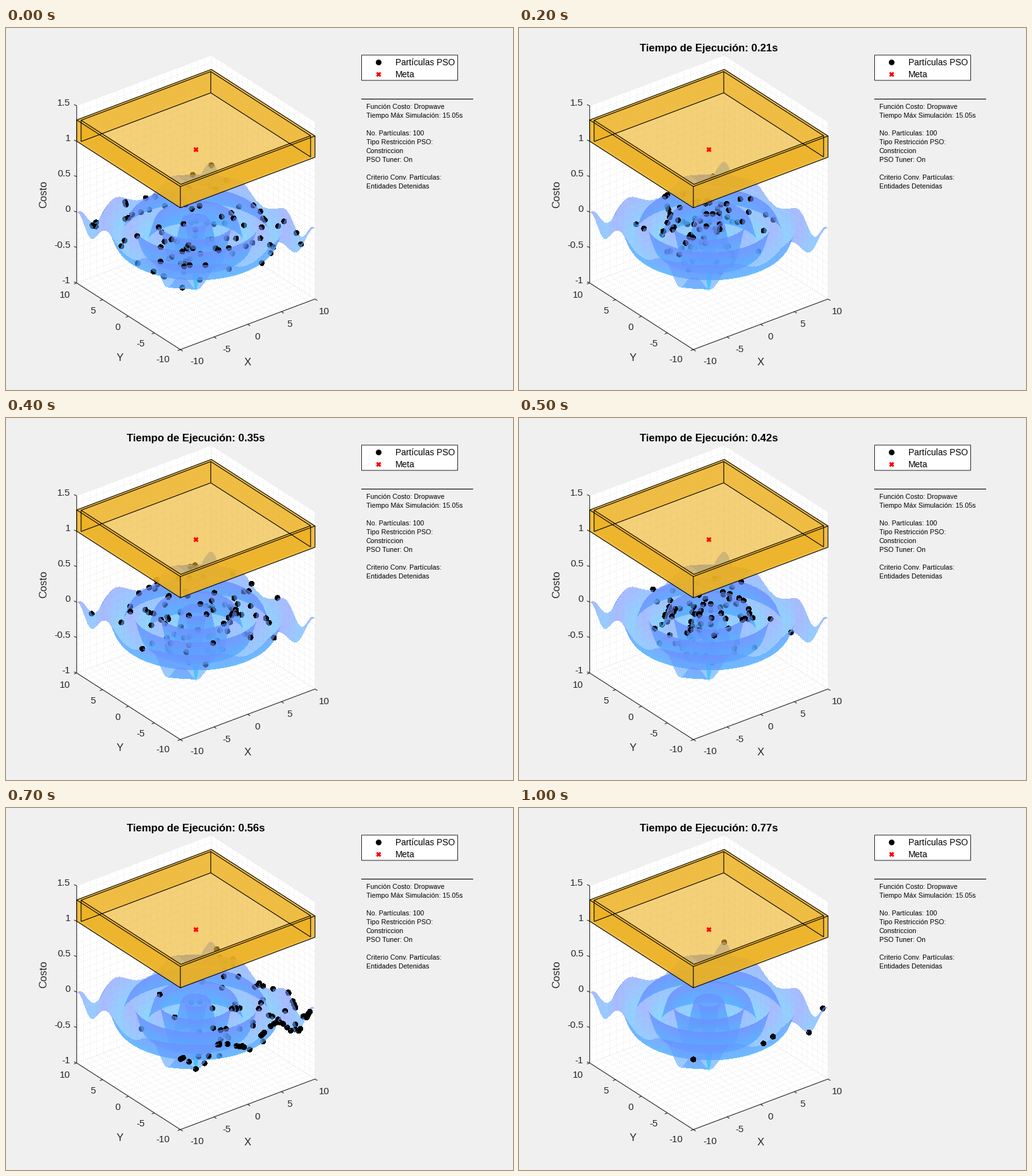
Animation, 802 px wide and 573 px high, one loop 1100 ms. Source, as a matplotlib script:

```python
import numpy as np
import matplotlib.pyplot as plt
from matplotlib.animation import FuncAnimation
from matplotlib.collections import LineCollection

W, H, DPI = 802, 573, 64
PT = 72 / DPI
FRAMES, STEP = 11, 100
INK = "#262626"

# orthographic view: screen step of one unit along each axis
OX, OY = 275.8, 509.0
XX, XY, YX, YY, ZY = 10.65, 4.0, 8.2, 5.27, 112.2

plt.rcParams["font.family"] = "Liberation Sans"
fig = plt.figure(figsize=(W / DPI, H / DPI), dpi=DPI, facecolor="#f0f0f0")
ax = fig.add_axes([0, 0, 1, 1])
ax.axis("off")


def proj(x, y, z):
    x, y, z = np.broadcast_arrays(*(np.asarray(v, float) for v in (x, y, z)))
    return np.stack([OX + XX * (x + 10) - YX * (y + 10),
                     OY - XY * (x + 10) - YY * (y + 10) - ZY * (z + 1)], -1)


def unproj(px, py, z):
    """Point at height z that is seen at the given pixel."""
    a, b = px - OX, OY - ZY * (z + 1) - py
    det = XX * YY + YX * XY
    return (YY * a + YX * b) / det - 10, (XX * b - XY * a) / det - 10


def depth(x, y, z):
    return -7.08 * x - 9.22 * y + 64.9 * z


def cost(x, y):
    r = np.hypot(x, y)
    return -(1 + np.cos(2.03 * r)) / (0.5 * r + 2)


def path3(pts):
    return proj(*np.array(pts, float).T)


def line(pts, color="k", width=1.1, z=1):
    pts = np.asarray(pts)
    ax.plot(pts[:, 0], pts[:, 1], color=color, lw=width * PT, zorder=z,
            snap=False, solid_capstyle="butt", solid_joinstyle="round")


def face(pts, color, alpha=1.0, z=0):
    p = path3(pts)
    ax.fill(p[:, 0], p[:, 1], fc=color, alpha=alpha, lw=0, zorder=z)


def text(x, y, s, size, ha="left", color=INK, **kw):
    """Text with its capitals centred on y."""
    return ax.text(x, y + 0.36 * size, s, fontsize=size * PT, ha=ha,
                   va="baseline", color=color, zorder=9, **kw)


def cross(x, y):
    ax.plot(x, y, "x", color="r", ms=6.6 * PT, mew=3 * PT, zorder=8)


# ---- axes box, grid and labels ----
def draw_axes():
    face([(-10, -10, -1), (10, -10, -1), (10, 10, -1), (-10, 10, -1)], "w")
    face([(-10, 10, -1), (10, 10, -1), (10, 10, 1.5), (-10, 10, 1.5)], "w")
    face([(10, -10, -1), (10, 10, -1), (10, 10, 1.5), (10, -10, 1.5)], "w")

    grid = []
    for v in range(-10, 11):
        grid.append(path3([(v, -10, -1), (v, 10, -1), (v, 10, 1.5)]))
        grid.append(path3([(-10, v, -1), (10, v, -1), (10, v, 1.5)]))
    for v in np.linspace(-1, 1.5, 26):
        grid.append(path3([(-10, 10, v), (10, 10, v), (10, -10, v)]))
    ax.add_collection(LineCollection(grid, colors="0.84", linewidths=0.9 * PT,
                                     linestyles=[(0, (1, 3))], zorder=0.5))

    line(path3([(10, -10, -1), (-10, -10, -1), (-10, 10, -1), (-10, 10, 1.5)]), INK)

    def tick(p, dx, dy):
        line([p, p + np.array([dx, dy])], INK)

    for i, v in enumerate(range(-10, 11, 5)):
        tick(proj(v, -10, -1), 3.8, 2.4)
        tick(proj(-10, v, -1), -4.2, 1.6)
        text(291 + 51 * i, 527 - 19.75 * i, str(v), 15)
        text(259 - 39.25 * i, 524 - 25.7 * i, str(v), 15, "right")
    for v in np.arange(-1, 1.6, 0.5):
        p = proj(-10, 10, v)
        tick(p, -4.2, -1.8)
        text(102, p[1] - 5.4, f"{v:g}", 15, "right")

    text(382, 528, "X", 16.6, "center")
    text(180, 521, "Y", 16.6, "center")
    ax.text(59.5, 263.5, "Costo", fontsize=16.6 * PT, rotation=90, color=INK,
            ha="center", va="center", zorder=9)


# ---- translucent tray above the surface ----
def draw_tray():
    gold, lo, hi = (237 / 255, 177 / 255, 32 / 255), 1.0, 1.3

    def ring(s):
        return [(-s, s), (s, s), (s, -s), (-s, -s)]   # left, back, right, front

    def at(xy, z):
        return (*xy, z)

    out, inn = ring(10), ring(9.63)
    face([at(p, lo) for p in out], gold, 0.6, 5)
    for i in range(4):
        j = (i + 1) % 4
        for r in (out, inn):
            face([at(r[i], lo), at(r[j], lo), at(r[j], hi), at(r[i], hi)], gold, 0.6, 5)
        face([at(out[i], hi), at(out[j], hi), at(inn[j], hi), at(inn[i], hi)], gold, 0.6, 5)

    for r, ids in ((out, (0, 3, 2)), (inn, (0, 1, 2))):
        line(path3([at(r[i % 4], hi) for i in range(5)]), z=6)
        line(path3([at(r[i], lo) for i in ids]), z=6)
        for i in ids:
            line(path3([at(r[i], lo), at(r[i], hi)]), z=6)
    cross(*proj(0, 0, 1))


# ---- legend and notes ----
def draw_notes():
    ax.add_patch(plt.Rectangle((562.5, 42.9), 152, 40, fc="w", ec=INK, lw=PT,
                               snap=False, zorder=7))
    ax.plot(589, 54, "o", color="k", ms=9 * PT, mew=0, zorder=8)
    cross(589, 73)
    text(616, 54.5, "Partículas PSO", 13.7, color="k")
    text(616, 73.5, "Meta", 13.7, color="k")
    line([(562, 112.5), (739, 112.5)])
    notes = ["Función Costo: Dropwave", "Tiempo Máx Simulación: 15.05s", "",
             "No. Partículas: 100", "Tipo Restricción PSO:", "Constriccion",
             "PSO Tuner: On", "", "Criterio Conv. Partículas:", "Entidades Detenidas"]
    for i, s in enumerate(notes):
        text(570, 124.5 + 14 * i, s, 10.67, color="k")


# ---- translucent surface, as layers along each line of sight ----
X0, X1, Y0, Y1 = 106, 496, 195, 425
PX, PY = np.meshgrid(np.arange(X0, X1) + 0.5, np.arange(Y0, Y1) + 0.5)
ALPHA, TOP = 0.6, 1.3


def trace(max_layers=20, steps=360):
    """Depth and height of every surface crossing, back to front."""
    far = np.full((max_layers, *PX.shape), -np.inf)
    height = np.zeros_like(far)
    count = np.zeros(PX.shape, int)
    last = np.full(PX.shape, np.nan)
    for z in np.linspace(-1.01, 0.01, steps):
        x, y = unproj(PX, PY, z)
        inside = np.maximum(abs(x), abs(y)) <= 10
        gap = np.where(inside, z - cost(x, y), np.nan)
        hit = (gap * last < 0) & (count < max_layers)
        i, j = np.nonzero(hit)
        far[count[hit], i, j] = depth(x, y, z)[hit]
        height[count[hit], i, j] = z
        count += hit
        last = gap
    n = count.max()
    return far[:n], height[:n]


far, height = trace()


def render(x, y):
    z = cost(x, y)
    near = np.full(PX.shape, -np.inf)   # depth of the closest dot per pixel
    for (cx, cy), d in zip(proj(x, y, z), depth(x, y, z)):
        disc = (PX - cx) ** 2 + (PY - cy) ** 2 < 4.6 ** 2
        near[disc] = np.maximum(near[disc], d)
    rgb = np.zeros((*PX.shape, 3))
    cover = np.isfinite(near).astype(float)
    for d, h in zip(far, height):
        a = ALPHA * (d > near)
        t = np.clip((h + 1) / (TOP + 1), 0, 1)
        tint = np.stack([t, 1 - t, np.ones_like(t)], -1)
        rgb += (tint - rgb) * a[..., None]
        cover += (1 - cover) * a
    rgb /= np.maximum(cover, 1e-6)[..., None]
    return np.clip(np.dstack([rgb, cover]), 0, 1)


# ---- swarm: contracts, spreads, runs to two walls, then settles ----
N = 100
REST = np.array([(-10, -10), (0.42, -10), (1.83, -10), (7.18, -10), (10, -9), (10, 10)])
rng = np.random.default_rng(12)
along = rng.uniform(-10, 10, N)
front = rng.random(N) < 0.55
home = np.where(front[:, None], np.stack([along, np.full(N, -10)], -1),
                np.stack([np.full(N, 10), along], -1))
gap = np.linalg.norm(home[:, None] - REST, axis=2)
rest = REST[gap.argmin(axis=1)]
order = rng.random((N, 1))


def cloud(k):
    r = np.random.default_rng(40 + k)
    if k == 0:
        return r.uniform(-10, 10, (N, 2))
    if k == 6:
        return np.clip(r.normal((1.2, -1.6), 7.2, (N, 2)), -10, 10)
    spread = 2.7 + 1.7 * np.sin(np.pi * (k - 1) / 4.6)
    return np.clip(r.normal((0.8, 2.6 - 0.5 * (k - 1)), spread, (N, 2)), -10, 10)


def swarm(k):
    if k <= 6:
        return cloud(k)
    if k <= 8:
        pull = np.clip((k - 6) * 0.5 + order - 0.2, 0, 1)
        return cloud(6) * (1 - pull) + home * pull
    return np.where(order < (k - 8) / 2, rest, home)


draw_axes()
draw_tray()
draw_notes()
title = text(300.5, 30.5, "", 16.7, "center", color="k", weight="bold")
scene = ax.imshow(np.zeros((*PX.shape, 4)), extent=(X0, X1, Y1, Y0), aspect="auto",
                  interpolation="nearest", zorder=3)
ax.set(xlim=(0, W), ylim=(H, 0))


def update(k):
    scene.set_data(render(*swarm(k).T))
    title.set_text(f"Tiempo de Ejecución: {0.07 * (k + 1):.2f}s" if k else "")
    return scene, title


anim = FuncAnimation(fig, update, frames=FRAMES, interval=STEP, repeat=True,
                     repeat_delay=0, blit=False)
plt.show()
```
